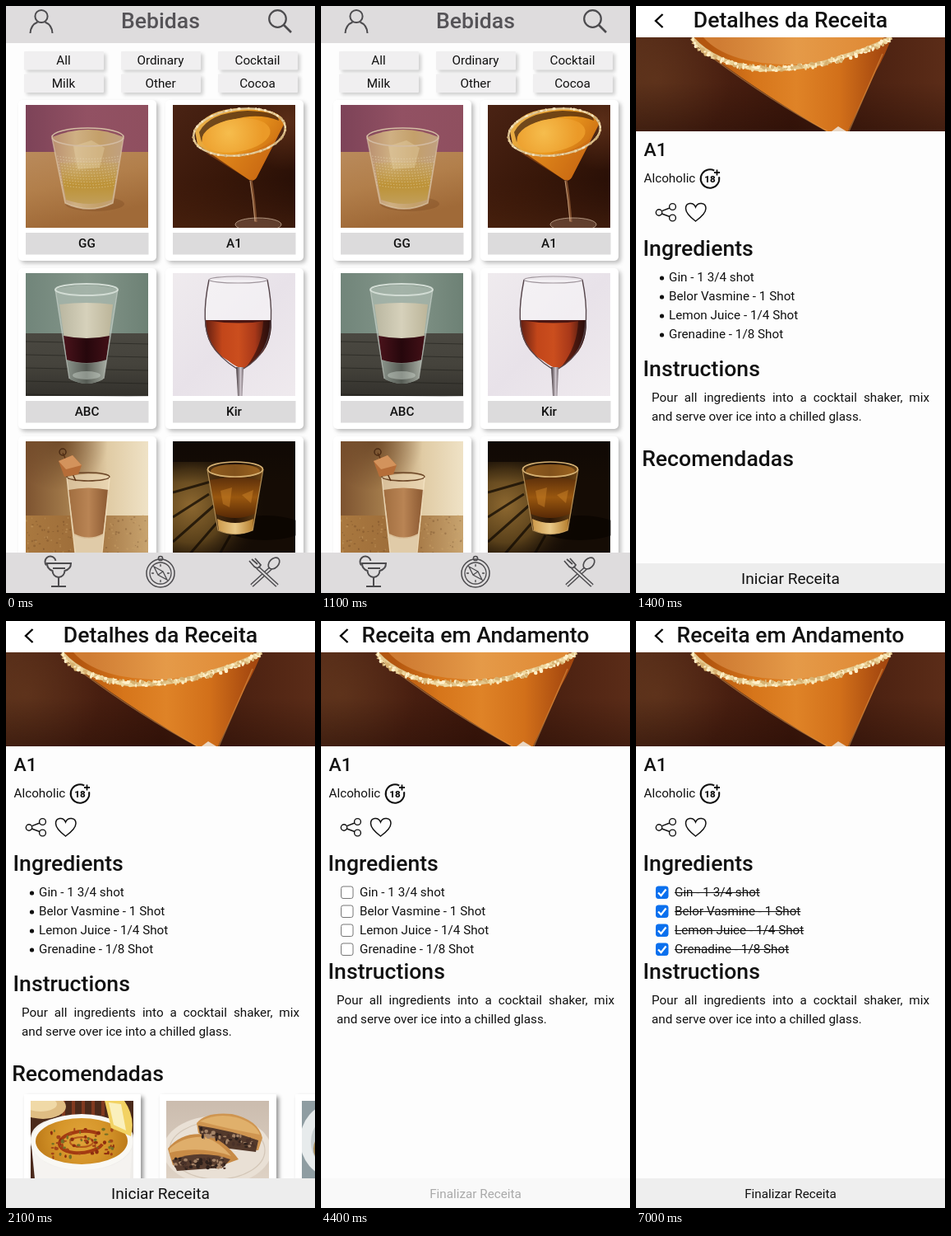
Recreate the animation shown at these times as an HTML page with a canvas. Size 376 by 712 pixels, loop 8000 ms.

```html
<!DOCTYPE html>
<html lang="pt">
<head>
<meta charset="utf-8">
<title>Bebidas</title>
<style>
html, body { margin: 0; width: 100%; height: 100%; overflow: hidden; background: #fdfdfd; }
#stage { position: relative; width: 376px; height: 712px; overflow: hidden; font-family: Roboto, sans-serif; }
canvas { position: absolute; left: 0; top: 0; }
#words div { position: absolute; line-height: 22.6px; white-space: nowrap; }
</style>
</head>
<body>
<div id="stage"><canvas id="c" width="376" height="712"></canvas><div id="words"></div></div>
<script>
const ctx = document.getElementById('c').getContext('2d');
const words = document.getElementById('words');
const LOOP = 8000;
const STEPS = [0, 1200, 1400, 1700, 3300, 5100, 5700, 6200, 6700];
const INK = '#111', ICON = '#4c4b4e', BAR = '#dedcdd';
const BODY = 15.25, HEAD = 26.6;
const ITEMS = ['Gin - 1 3/4 shot', 'Belor Vasmine - 1 Shot', 'Lemon Juice - 1/4 Shot', 'Grenadine - 1/8 Shot'];
const HOWTO = ['Pour all ingredients into a cocktail shaker, mix', 'and serve over ice into a chilled glass.'];

// ---------- helpers ----------
let seed = 1;
function rnd() {
  seed = (seed * 16807) % 2147483647;
  return seed / 2147483647;
}

// y is the middle of the line
function text(str, x, y, size = BODY, opt = {}) {
  const d = document.createElement('div'), s = d.style;
  d.textContent = str;
  s.top = y - 11.3 + 'px';
  s.left = (opt.mid ? x - 200 : x) + 'px';
  if (opt.mid) { s.width = '400px'; s.textAlign = 'center'; }
  if (opt.span) { s.width = opt.span + 'px'; s.whiteSpace = 'normal'; s.textAlignLast = 'justify'; }
  if (opt.strike) s.textDecoration = 'line-through';
  s.fontSize = size + 'px';
  s.fontWeight = opt.weight || 400;
  s.color = opt.color || INK;
  words.append(d);
}
const title = (str, x, y, size = HEAD) => text(str, x, y, size, { weight: 500 });
function howTo(y) {
  title('Instructions', 8.6, y);
  text(HOWTO[0], 19, y + 35.5, BODY, { span: 338 });
  text(HOWTO[1], 19, y + 58.3);
}

function box(color, x, y, w, h) {
  ctx.fillStyle = color;
  ctx.fillRect(x, y, w, h);
}
function fill(color, d) {
  ctx.fillStyle = color;
  ctx.fill(new Path2D(d));
}
function line(color, width, d) {
  ctx.strokeStyle = color;
  ctx.lineWidth = width;
  ctx.stroke(new Path2D(d));
}
function oval(color, x, y, rx, ry, turn = 0) {
  ctx.fillStyle = color;
  ctx.beginPath();
  ctx.ellipse(x, y, rx, ry, turn, 0, 7);
  ctx.fill();
}
function ring(color, width, x, y, rx, ry = rx, turn = 0, from = 0, to = 2 * Math.PI) {
  ctx.strokeStyle = color;
  ctx.lineWidth = width;
  ctx.beginPath();
  ctx.ellipse(x, y, rx, ry, turn, from, to);
  ctx.stroke();
}
function stops(g, colors) {
  colors.forEach((c, i) => g.addColorStop(i / (colors.length - 1), c));
  return g;
}
const lin = (x0, y0, x1, y1, ...cs) => stops(ctx.createLinearGradient(x0, y0, x1, y1), cs);
const rad = (x, y, r, ...cs) => stops(ctx.createRadialGradient(x, y, 0, x, y, r), cs);

function raised(color, x, y, w, h, r, blur, alpha) {
  ctx.save();
  ctx.shadowColor = `rgba(0,0,0,${alpha})`;
  ctx.shadowOffsetX = ctx.shadowOffsetY = 3;
  ctx.shadowBlur = blur;
  ctx.fillStyle = color;
  ctx.beginPath();
  ctx.roundRect(x, y, w, h, r);
  ctx.fill();
  ctx.restore();
}
function photo(draw, x, y, w, h) {
  ctx.save();
  ctx.translate(x, y);
  ctx.beginPath();
  ctx.rect(0, 0, w, h);
  ctx.clip();
  seed = 77;
  draw();
  ctx.restore();
}
function grain(n, colors, place, size = 1.5) {
  for (let i = 0; i < n; i++) {
    const [x, y] = place(rnd(), rnd());
    oval(colors[i % colors.length], x, y, size * (0.5 + rnd()), size * (0.5 + rnd()));
  }
}

// ---------- pictures ----------
function tumbler() {
  box(lin(0, 0, 149, 0, '#7d4358', '#925163', '#8f4f5f'), 0, 0, 149, 60);
  box(lin(0, 57, 20, 149, '#b98a5b', '#b27f4b', '#a06a38'), 0, 57, 149, 92);
  oval('rgba(90,45,15,.2)', 84, 120, 36, 9);
  fill(lin(32, 0, 118, 0, '#b98f70', '#cfb083', '#c4a06a', '#c0a080'), 'M32 39Q76 21 119 39L106 119Q77 133 48 119Z');
  fill(lin(0, 68, 0, 126, 'rgba(196,160,70,.2)', '#bd9236', '#c2a263'), 'M41 70H113L105 115Q77 125 49 115Z');
  fill('rgba(235,220,180,.32)', 'M58 50L80 43 96 52 90 76 63 78Z');
  ctx.setLineDash([1.5, 2]);
  for (let y = 62; y < 98; y += 3.5) {
    line('rgba(235,222,190,.4)', 1.2, `M${38 + (y - 62) * .16} ${y}Q77 ${y + 7} ${115 - (y - 62) * .16} ${y}`);
  }
  ctx.setLineDash([]);
  ring('#d3bca3', 1.6, 75.5, 39, 43.5, 11);
  line('rgba(225,205,175,.65)', 1.4, 'M32 40L48 119Q77 133 106 119L119 40');
}

function martini() {
  box(lin(0, 0, 149, 149, '#4a2314', '#381709', '#200b05'), 0, 0, 149, 149);
  box(rad(140, 20, 60, 'rgba(105,55,30,.7)', 'rgba(105,55,30,0)'), 0, 0, 149, 149);
  box(lin(0, 90, 0, 149, 'rgba(70,30,12,0)', 'rgba(80,38,16,.6)'), 0, 90, 149, 59);
  fill(lin(30, 20, 125, 80, '#e8b04a', '#ea981f', '#c4640f'), 'M27 32Q40 2 92 4 137 6 135 24L102 88Q97 95 90 89L30 48Z');
  fill('rgba(50,20,8,.65)', 'M32 33Q44 9 91 7 130 8 129 19 104 9 72 18 45 22 35 45Z');
  oval(rad(68, 34, 42, '#f6bd4d', '#eb9a28'), 77, 37, 42, 20, -.15);
  fill('rgba(200,100,18,.45)', 'M40 58Q94 68 128 38L102 88Q97 95 90 89Z');
  line('#7b4a2a', 3.2, 'M95 91Q99 115 101 142');
  line('rgba(240,205,165,.7)', .9, 'M94 92Q98 116 100 141');
  oval('rgba(190,155,135,.28)', 104, 145, 28, 8);
  ring('rgba(215,190,165,.7)', 1, 104, 145, 28, 8);
  ring('#e0c797', 2.4, 81, 33, 56, 28, -.12);
  grain(110, ['#f7e5bf', '#cfae78', '#ead09c'], a => {
    const q = a * 6.28, x = 56 * Math.cos(q), y = 28 * Math.sin(q);
    return [81 + x + y * .12, 33 + y - x * .12];
  }, 1.2);
}

function shot() {
  box(lin(0, 0, 149, 0, '#71857a', '#84968a', '#6d8175'), 0, 0, 149, 76);
  box(lin(0, 72, 0, 149, '#4a4841', '#45433c', '#33312c'), 0, 73, 149, 76);
  for (let y = 83; y < 149; y += 16) line('rgba(25,24,20,.5)', 1, `M0 ${y}L149 ${y + 3}`);
  fill('rgba(185,198,188,.6)', 'M36 19Q74 10 112 19L95 128Q75 140 53 128Z');
  fill(lin(40, 0, 108, 0, '#b9b6a0', '#d6d1bb', '#bab397'), 'M41 38Q74 34 106 38L101 80H47Z');
  fill(lin(46, 0, 102, 0, '#4a131b', '#26070c', '#421017'), 'M46 76Q74 82 102 76L98 105Q74 113 50 105Z');
  fill(lin(50, 0, 98, 0, '#8a938a', '#565b54', '#a5aba1'), 'M50 106Q74 113 98 106L94 129Q75 139 54 129Z');
  oval('rgba(205,212,205,.45)', 74, 124, 17, 5);
  ring('#d2dcd4', 2, 74, 20, 38, 7);
  line('rgba(225,232,226,.5)', 1.3, 'M36 20L53 128M112 20L95 128');
}

function wine() {
  box(lin(0, 0, 149, 149, '#efebee', '#e8e2e9', '#efeaee'), 0, 0, 149, 149);
  ctx.translate(1, 0);
  fill('rgba(255,255,255,.4)', 'M45 8L113 8Q124 48 118 60H39Q37 35 45 8Z');
  fill(lin(39, 0, 119, 0, '#641f12', '#c2461a', '#cb4e1e', '#a83819', '#2c100d'), 'M38 57H119Q119 90 101 103 91 114 84 116 76 114 66 106 39 92 38 57Z');
  fill('#4c1713', 'M38 57H119Q79 64 38 57Z');
  fill('rgba(35,10,10,.6)', 'M119 57Q121 92 89 113 108 88 109 58Z');
  line('#55454a', 1.4, 'M43 8Q32 62 46 86 56 103 77 116M114 8Q125 62 110 91 102 106 85 116');
  fill(lin(76, 0, 87, 0, '#3d3236', '#cfc6cd', '#372a30'), 'M76 114H85L83.500 149H78Z');
  ring('#9f959c', 1.2, 78.5, 8, 35.5, 4);
}

function toffee() {
  box(lin(0, 0, 149, 0, '#7d5330', '#a27a4a', '#e0cba4', '#efe2c6'), 0, 0, 149, 149);
  box(rad(40, 0, 60, 'rgba(85,50,25,.6)', 'rgba(85,50,25,0)'), 0, 0, 149, 149);
  box(lin(0, 0, 149, 0, '#a9783f', '#9c6c39', '#c8a470'), 0, 90, 149, 59);
  grain(160, ['rgba(205,165,105,.4)', 'rgba(80,45,20,.25)'], (a, b) => [a * 149, 90 + b * 46], 1);
  fill('rgba(235,215,180,.75)', 'M50 43Q76 36 103 43L93 135H60Z');
  fill(lin(52, 0, 101, 0, '#a16e40', '#b98454', '#8a5831'), 'M52 59Q76 54 101 59L94 112Q77 121 59 112Z');
  fill('#e0cba8', 'M59 114Q77 122 94 114L92 135H60Z');
  ring('#6b4526', 1.4, 76, 43, 26, 5);
  line('rgba(245,228,195,.8)', 1.4, 'M50 44L60 135M102 44L93 135');
  line('#5c3316', 1.5, 'M45 14L61 48');
  ring('#4a2b14', 1.5, 45, 13, 4);
  fill('#b66d38', 'M40 24L57 17 68 29 64 40 47 43Z');
  fill('#d3935c', 'M40 24L57 17 68 29 49 34Z');
}

function whisky() {
  box('#150c05', 0, 0, 149, 149);
  box(rad(22, 78, 90, '#8d6830', '#59401a', 'rgba(21,12,5,0)'), 0, 25, 149, 124);
  box(lin(0, 0, 0, 50, '#100905', 'rgba(16,9,5,0)'), 0, 0, 149, 50);
  line('rgba(15,8,2,.75)', 3, 'M0 62L60 45M0 92L44 64M0 122L50 78M10 149L56 96M50 149L70 114');
  oval('rgba(10,5,0,.75)', 112, 105, 48, 15);
  fill(lin(42, 0, 109, 0, '#4f3212', '#2b1707', '#6b4314'), 'M42 32Q76 22 110 32L98 108Q76 117 54 108Z');
  fill(lin(0, 44, 0, 92, '#5d300b', '#99570f', '#5a2b06'), 'M45 47Q76 40 107 47L100 88Q76 98 52 88Z');
  fill('rgba(215,140,45,.4)', 'M58 60L72 56 69 80 61 76ZM84 65L98 59 95 75Z');
  fill(lin(52, 0, 100, 0, '#c99444', '#eac988', '#b17826'), 'M54 94Q76 104 98 94L97 108Q76 117 56 108Z');
  oval('rgba(200,130,45,.55)', 76, 36, 30, 8);
  ring('#d6b173', 1.7, 76, 34, 33.5, 9);
  line('rgba(215,175,110,.7)', 1.3, 'M42 34L55 108Q76 117 97 108L110 34');
}

function banner() {
  box(lin(0, 0, 376, 0, '#552c18', '#4a2011', '#3d170b', '#4b2111', '#5b2c18'), 0, 0, 376, 114);
  box(rad(25, 50, 90, 'rgba(105,60,32,.5)', 'rgba(105,60,32,0)'), 0, 0, 376, 114);
  box(lin(0, 55, 0, 114, 'rgba(30,9,4,0)', 'rgba(30,9,4,.4)'), 0, 55, 376, 59);
  fill(lin(90, 0, 300, 0, '#b3560f', '#d6751a', '#df8327', '#d2701a', '#a5480f'), 'M70 0H311Q304 20 292 41L258 114H232Q165 76 92 23Z');
  fill(lin(100, 0, 290, 0, '#cf7c33', '#e59a48', '#df8a36'), 'M82 0H302Q280 24 195 33 112 34 82 0Z');
  line('rgba(230,160,80,.5)', 1.5, 'M92 24Q165 78 233 114M300 20L259 114');
  fill('#e9d7c4', 'M238 114L246 108 256 114Z');
  line('#e4c88e', 5, 'M68 1Q94 31 151 39 210 39 250 24 286 14 311 0');
  grain(230, ['#fff0c9', '#d7b272', '#f0d9a1'], (a, b) => {
    const x = 68 + a * 241, u = (x - 68) / 243;
    return [x, 38 * Math.pow(Math.sin(Math.PI * Math.pow(u, .78)), .75) + b * 6 - 3];
  }, 1.8);
}

function soup() {
  box('#4b2a1b', 0, 0, 125, 95);
  for (let x = 38; x < 100; x += 12) box('#81391f', x, 0, 4, 18);
  oval('#dfbd83', 15, 7, 28, 15);
  oval('#f0d9a7', 12, 4, 20, 9);
  fill('#efedea', 'M0 45Q2 19 62 18 125 20 125 45V95H5Z');
  oval('#f9f8f4', 62, 50, 62, 34);
  oval(rad(62, 44, 58, '#dfa43a', '#d6962a', '#bc7918'), 62, 49, 56, 28);
  ring('#a33b12', 4, 62, 50, 27, 13, -.1, .4, 5.6);
  ring('#b4571b', 2, 62, 50, 14, 6);
  grain(65, ['#8e2d10', '#a34518', '#747026'], (a, b) => [25 + a * 76, 34 + b * 35], 1.8);
  fill('#f2d263', 'M90 0H114Q128 20 122 43L98 33Z');
  fill('#faf0bd', 'M95 2L110 4 116 36 101 29Z');
  fill('#f5f3f0', 'M2 58Q16 84 62 84 108 84 123 59L121 95H6Z');
}

function pie() {
  box(lin(0, 0, 0, 95, '#cbbcae', '#ded2c5'), 0, 0, 125, 95);
  oval('#e9e0d5', 62, 60, 66, 42);
  ring('#d3c6b7', 1.2, 62, 60, 58, 35);
  fill('#cf9550', 'M37 27Q48 13 80 16 112 23 117 45L112 60 75 57 39 39Z');
  fill('#e0b06b', 'M41 25Q61 14 85 20 109 27 114 41 80 35 41 25Z');
  fill('#53392b', 'M39 30Q80 36 112 48L109 62 77 58 41 40Z');
  fill('#c88b46', 'M2 58Q19 37 49 41 71 48 88 71L66 79 8 78Z');
  fill('#dfae6b', 'M4 58Q22 42 47 44 65 50 79 67 42 54 4 63Z');
  fill('#573c2e', 'M7 72Q40 58 78 71L69 81 13 85Z');
  grain(120, ['#2e211c', '#a58468', '#493128'], (a, b) => a < .5
    ? [42 + a * 130, 32 + a * 28 + b * 12]
    : [11 + (a - .5) * 120, 70 + b * 12], 1.8);
}

function plate() {
  box('#8f9da2', 0, 0, 20, 95);
  oval('#e7ebec', 36, 48, 38, 44);
  oval('#c7ced0', 40, 50, 29, 33);
  oval('#a58a58', 42, 58, 28, 24);
}

// ---------- icons ----------
function topIcons() {
  ring(ICON, 2, 43, 12.5, 7.6);
  line(ICON, 2, 'M29.500 33Q30 23 38.500 19.500M56.500 33Q56 23 47.500 19.500');
  ring(ICON, 2.2, 330.5, 15.5, 10.3);
  line(ICON, 2.6, 'M338 23L347 32');
}
function tube(d) {
  line(ICON, 5, d);
  line(BAR, 2, d);
}
function navIcons() {
  line(ICON, 2, 'M50 676H79Q79 683 71.500 685 71 692 64 693 57 692 56.500 685 50 683 50 676ZM57 682H72M64 693V703M55 704H73');
  ring(ICON, 2, 54, 674, 6.5, 6.5, 0, 2.4, 6.1);
  ring(ICON, 1.5, 188, 688, 17);
  ring(ICON, 1.3, 188, 688, 13);
  ring(ICON, 1.5, 188, 670, 2.6);
  line(ICON, 1.3, 'M180 680L191 686 196 696 185 690ZM191 686L185 690M188 677V680M188 696V699M177 688H180M196 688H199');
  tube('M322 682L299 703');
  tube('M306 681L330 703');
  line(ICON, 1.7, 'M296 673L302 680Q307 684 310 678L303 670M299 671L306 677');
  ring(ICON, 1.7, 326, 676, 8, 5.5, -.8);
}
function actions(y) {
  ctx.save();
  ctx.translate(0, y);
  line(INK, 1.4, 'M31.500 -1.300L41 -5M31.500 2L41 5.500');
  ring(INK, 1.4, 28, .5, 3.7);
  ring(INK, 1.4, 44.5, -6.5, 3.9);
  ring(INK, 1.4, 44.5, 7, 3.9);
  line(INK, 1.5, 'M72.500 11Q60.500 2 60.500 -4.500C60.500 -11.500 69.500 -13 72.500 -6 75.500 -13 85 -11.500 85 -4.500Q85 2 72.500 11Z');
  ctx.restore();
}

// ---------- screens ----------
function listScreen() {
  box(BAR, 0, 0, 376, 45);
  topIcons();
  text('Bebidas', 188, 18, HEAD, { mid: true, weight: 500, color: '#555357' });
  ['All', 'Ordinary', 'Cocktail', 'Milk', 'Other', 'Cocoa'].forEach((name, i) => {
    const x = 22 + (i % 3) * 118, y = i < 3 ? 55 : 82.5;
    raised('#f0eff0', x, y, 97, 22.5, 1, 4, .18);
    text(name, x + 48, y + 11.5, BODY, { mid: true });
  });
  const drinks = [['GG', tumbler], ['A1', martini], ['ABC', shot], ['Kir', wine], ['', toffee], ['', whisky]];
  drinks.forEach(([name, draw], i) => {
    const x = 24 + (i % 2) * 179, y = 120 + (i >> 1) * 204;
    raised('#fff', x - 9, y - 6, 168, 195, 5, 5, .25);
    photo(draw, x, y, 149.5, 149.5);
    if (!name) return;
    box('#dcdbdc', x, y + 155, 149.5, 26.5);
    text(name, x + 74.5, y + 168, BODY, { mid: true, weight: 500 });
  });
  box(BAR, 0, 663, 376, 49);
  navIcons();
}

function frameScreen(name) {
  box('#fff', 0, 0, 376, 38);
  line('#000', 2.4, 'M32.500 10L24 18 32.500 26');
  text(name, 188, 17.5, HEAD, { mid: true, weight: 500 });
}
function recipeTop() {
  photo(banner, 0, 38, 376, 114);
  title('A1', 9.5, 175, 22.8);
  text('Alcoholic', 9.5, 209);
  ring(INK, 2, 90, 209.5, 11.3, 11.3, 0, -.2, 5.2);
  text('18', 90, 210, 11.5, { mid: true, weight: 900 });
  line(INK, 1.8, 'M98.500 198.500V205.500M95 202H102');
  actions(250);
  title('Ingredients', 8.6, 294);
}
function footer(label, size, bg, color) {
  box(bg, 0, 676, 376, 36);
  text(label, 188, 695.5, size, { mid: true, color });
}

function detailScreen(loaded, cards) {
  frameScreen('Detalhes da Receita');
  if (loaded) {
    recipeTop();
    ITEMS.forEach((item, i) => {
      oval(INK, 31.5, 330 + 23 * i, 2.6, 2.6);
      text(item, 40, 329 + 23 * i);
    });
    howTo(440);
    title('Recomendadas', 7.2, 549);
  } else {
    ctx.strokeStyle = '#dcdcdc';
    ctx.lineWidth = 1;
    ctx.strokeRect(.5, 37.5, 375, 114);
    actions(189);
    title('Ingredients', 8.6, 233);
    title('Instructions', 8.6, 281);
    title('Recomendadas', 7.2, 335);
  }
  if (cards) [soup, pie, plate].forEach((draw, i) => {
    const x = 30 + 165 * i;
    raised('#fff', x - 8, 574, 142, 130, 1, 5, .42);
    photo(draw, x, 582, 125, 95);
  });
  footer('Iniciar Receita', 19.1, '#ededed');
}

function cookScreen(done) {
  frameScreen('Receita em Andamento');
  recipeTop();
  ITEMS.forEach((item, i) => {
    const y = 329 + 23 * i, on = i < done;
    ctx.beginPath();
    ctx.roundRect(24.5, y - 7, 14.5, 14.5, 2.5);
    ctx.fillStyle = on ? '#0b70ee' : '#fff';
    ctx.fill();
    ctx.lineWidth = 1;
    ctx.strokeStyle = on ? '#0b70ee' : '#767676';
    ctx.stroke();
    if (on) line('#fff', 2.2, `M27 ${y + .5}L30.500 ${y + 4} 36.500 ${y - 3.5}`);
    text(item, 47, y, BODY, { strike: on });
  });
  howTo(425);
  const ready = done === ITEMS.length;
  footer('Finalizar Receita', BODY, ready ? '#eeeeee' : '#f9f9f9', ready ? INK : '#a9a9a9');
}

// ---------- playback ----------
function render(step) {
  words.textContent = '';
  box('#fdfdfd', 0, 0, 376, 712);
  if (step === 0) listScreen();
  else if (step < 4) detailScreen(step > 1, step > 2);
  else cookScreen(step - 4);
}

let shown = -1;
const start = performance.now();
function tick() {
  const t = (performance.now() - start) % LOOP;
  const step = STEPS.filter(s => s <= t).length - 1;
  if (step !== shown) render(shown = step);
  requestAnimationFrame(tick);
}
tick();
</script>
</body>
</html>
```
